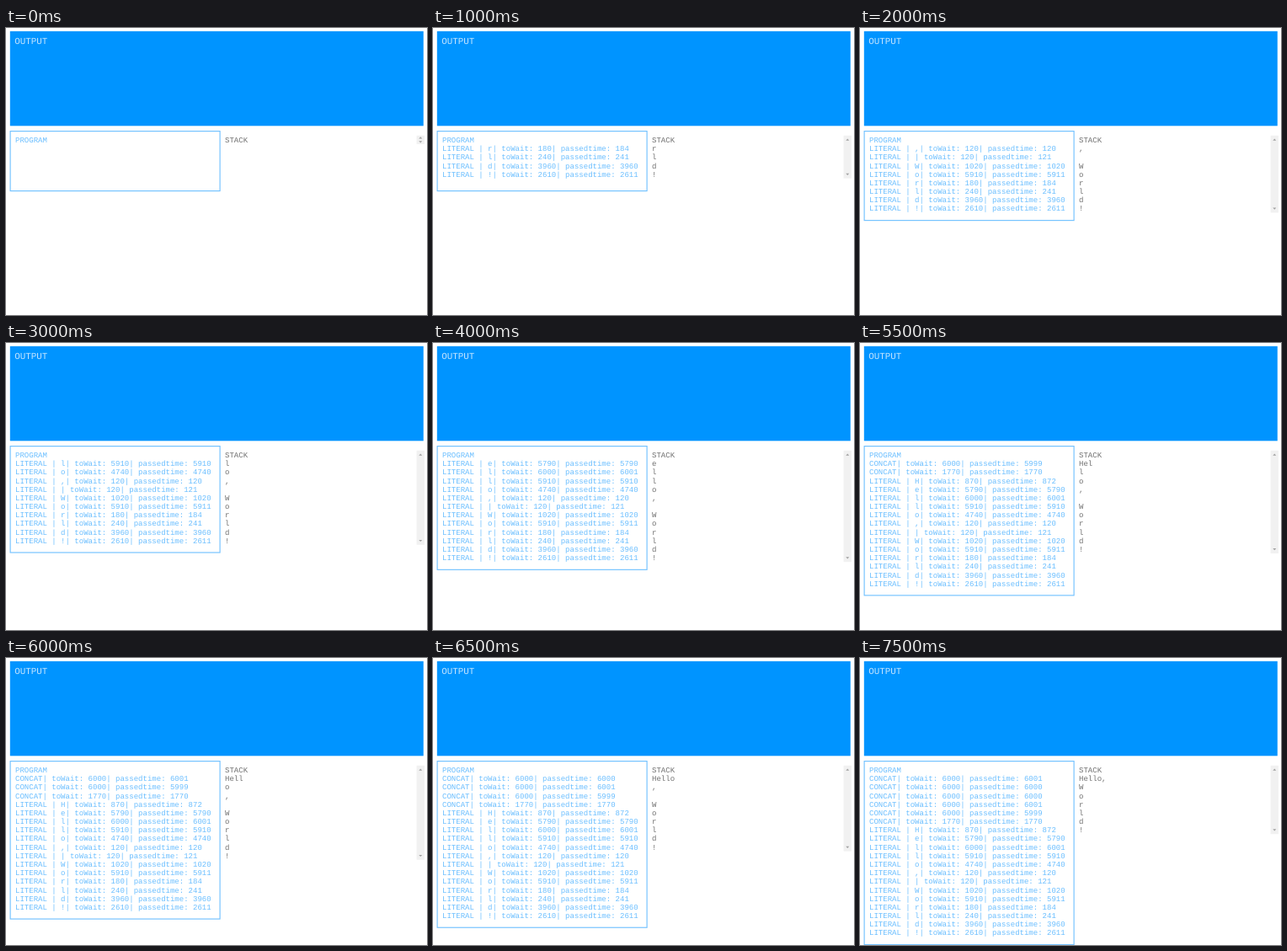
An HTML page for the animation above (8000 ms loop, 500 px wide and 341 px high).

```html
<!DOCTYPE html>
<html lang="en">
<head>
<meta charset="utf-8">
<style>
html, body { margin: 0; width: 100%; height: 100%; overflow: hidden; background: #fff; }
svg { display: block; width: 500px; height: 341px; }
text {
  font: 9.03px "Courier New", "Liberation Mono", monospace;
  white-space: pre;
  text-rendering: geometricPrecision;
}
#program { fill: #6abeff; }
#stack { fill: #707070; }
</style>
</head>
<body>
<svg viewBox="0 0 500 341">
  <rect x="4.8" y="3.8" width="491" height="112.5" fill="#0094ff"/>
  <text x="10.2" y="18.8" style="font-size:10.85px" fill="#c4e5ff">OUTPUT</text>
  <rect id="box" x="5.1" y="122.6" width="249" fill="none" stroke="#6fc0ff" stroke-width="1.13"/>
  <g id="program"></g>
  <g id="stack"></g>
  <rect id="track" x="487.6" y="127.8" width="9.5" fill="#f1f1f1"/>
  <path id="up" d="M-2 1.1L0 -1.1L2 1.1Z" fill="#a0a0a0"/>
  <path id="down" d="M-2 -1.1L0 1.1L2 -1.1Z" fill="#a0a0a0"/>
</svg>
<script>
const LINE = 10.18, TOP = 127.8, STEP = 500, LOOP = 8000;
const $ = id => document.getElementById(id);

// Operations in execution order: [literal or null for concat, wait, passed]
const ops = [
  ["!", 2610, 2611], ["d", 3960, 3960], ["l", 240, 241], ["r", 180, 184],
  ["o", 5910, 5911], ["W", 1020, 1020], [" ", 120, 121], [",", 120, 120],
  ["o", 4740, 4740], ["l", 5910, 5910], ["l", 6000, 6001], ["e", 5790, 5790],
  ["H", 870, 872], [null, 1770, 1770], [null, 6000, 5999], [null, 6000, 6001],
  [null, 6000, 6000], [null, 6000, 6000], [null, 6000, 6001]
];
const startCounts = [0, 1, 4, 5];   // afterwards one operation per step

function describe([char, wait, passed]) {
  const name = char === null ? "CONCAT" : `LITERAL | ${char.trim()}`;
  return `${name}| toWait: ${wait}| passedtime: ${passed}`;
}

function runStack(done) {
  const stack = [];
  for (const [char] of done) {
    if (char === null) stack.unshift(stack.shift() + stack.shift());
    else stack.unshift(char);
  }
  return stack;
}

function writeLines(id, x, lines) {
  $(id).innerHTML = lines.map((line, i) =>
    `<text x="${x}" y="${(136 + i * LINE).toFixed(2)}">${line}</text>`).join("");
}

function show(step) {
  const count = startCounts[step] ?? step + 4;
  const done = ops.slice(0, count), stack = runStack(done);
  writeLines("program", 11, ["PROGRAM", ...done.map(describe).reverse()]);
  writeLines("stack", 260, ["STACK", ...stack]);
  $("box").setAttribute("height", Math.max(71, LINE * (count + 1) + 14.4));

  const height = LINE * (stack.length + 1), inset = Math.min(4.8, height / 4);
  $("track").setAttribute("height", height);
  $("up").setAttribute("transform", `translate(492.3 ${TOP + inset})`);
  $("down").setAttribute("transform", `translate(492.3 ${TOP + height - inset})`);
}

let shown = -1;
function tick() {
  const step = Math.floor(performance.now() % LOOP / STEP);
  if (step !== shown) show(shown = step);
  requestAnimationFrame(tick);
}
tick();
</script>
</body>
</html>
```
